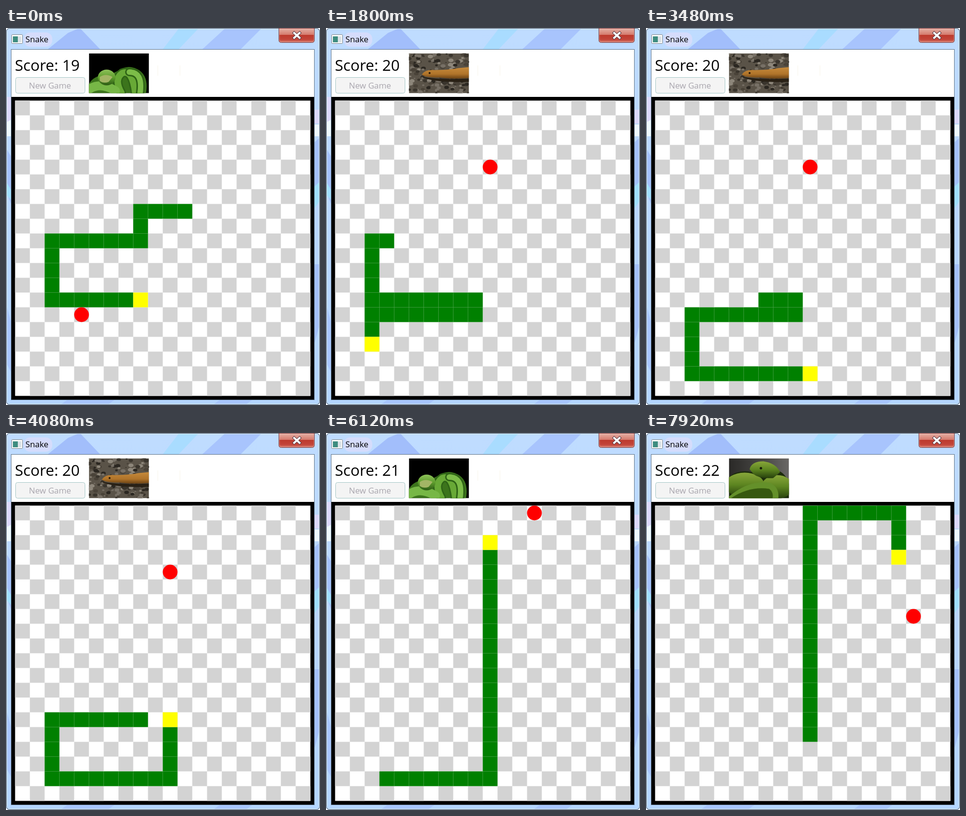
These frames come from a looping animation (638x766 px, 8000 ms). An HTML page with a canvas:

```html
<!DOCTYPE html>
<html lang="en">
<head>
<meta charset="utf-8">
<title>Snake</title>
<style>
html, body { margin: 0; width: 100%; height: 100%; overflow: hidden; background: #fff; }
#stage { position: relative; width: 638px; height: 766px; overflow: hidden; }
svg, canvas { position: absolute; display: block; }
svg { left: 0; top: 0; }
canvas { left: 11px; top: 140px; }
text { font-family: "Open Sans", "Noto Sans", sans-serif; }
</style>
</head>
<body>
<div id="stage">
<svg width="638" height="766" viewBox="0 0 638 766">
  <defs>
    <clipPath id="win"><path d="M0 766V8Q0 0 8 0H630Q638 0 638 8V758Q638 766 630 766H8Q0 766 0 758Z"/></clipPath>
    <clipPath id="pic"><rect x="0" y="0" width="122" height="81"/></clipPath>
    <linearGradient id="glass" x1="0" y1="0" x2="0" y2="1">
      <stop offset="0" stop-color="#bfdcff"/><stop offset=".5" stop-color="#b9d7ff"/><stop offset="1" stop-color="#b4d6ff"/>
    </linearGradient>
    <linearGradient id="red" x1="0" y1="0" x2="0" y2="1">
      <stop offset="0" stop-color="#e6b3a8"/><stop offset=".46" stop-color="#d4796c"/>
      <stop offset=".48" stop-color="#bd3a2e"/><stop offset=".8" stop-color="#c2453a"/><stop offset="1" stop-color="#dc8678"/>
    </linearGradient>
    <linearGradient id="skin" x1="0" y1="0" x2="0" y2="1">
      <stop offset="0" stop-color="#8fc25a"/><stop offset=".5" stop-color="#5f9e2e"/><stop offset="1" stop-color="#2c5a14"/>
    </linearGradient>
    <linearGradient id="moss" x1="0" y1="0" x2="0" y2="1">
      <stop offset="0" stop-color="#88a63a"/><stop offset=".5" stop-color="#5c8420"/><stop offset="1" stop-color="#263f0c"/>
    </linearGradient>
    <linearGradient id="tan" x1="0" y1="0" x2="0" y2="1">
      <stop offset="0" stop-color="#c58a3c"/><stop offset=".6" stop-color="#b0742a"/><stop offset="1" stop-color="#6b4214"/>
    </linearGradient>
    <linearGradient id="dusk" x1="0" y1="0" x2="1" y2="0">
      <stop offset="0" stop-color="#2a2927"/><stop offset=".6" stop-color="#4a4947"/><stop offset="1" stop-color="#6a6866"/>
    </linearGradient>
  </defs>

  <!-- window frame -->
  <g clip-path="url(#win)">
    <rect width="638" height="766" fill="url(#glass)"/>
    <path d="M84 44L126 10L150 0L192 44Z" fill="#a2befb"/>
    <path d="M318 44L352 0H392L350 44Z" fill="#a9dcff"/>
    <path d="M398 44L446 0H520L476 44Z" fill="#a8c4fd"/>
    <path d="M0 140H11V192H0ZM627 166H638V194H627Z" fill="#dcd8fb"/>
    <path d="M0 192L11 186V220H0ZM627 196H638V220H627Z" fill="#eefaff"/>
    <path d="M0 244L11 262V360L0 330ZM627 232L638 222V312L627 322ZM627 480H638V600L627 640Z" fill="#a4c1fc"/>
    <path d="M0 312L11 330V350L0 338ZM627 322L638 312V350L627 366Z" fill="#a0dffe"/>
    <path d="M0 560L11 600V700L0 680ZM110 766L124 756H220L206 766ZM420 766L434 756H500L486 766Z" fill="#a8c6fd"/>
    <rect x="36" y="9" width="58" height="29" rx="13" fill="#dcdcfb" opacity=".75"/>
    <path d="M1.5 760V8Q1.5 1.5 8 1.5H630Q636.5 1.5 636.5 8V758Q636.5 764.5 630 764.5H8Q1.5 764.5 1.5 758" fill="none" stroke="#e4f2ff"/>
    <rect x=".5" y=".5" width="637" height="765" rx="7.5" fill="none" stroke="#2c3a4a"/>
  </g>

  <!-- title bar -->
  <g>
    <rect x="11.5" y="13.5" width="22" height="18" rx="1" fill="#fbfbfb" stroke="#80868c"/>
    <rect x="14" y="17" width="17" height="12" fill="#d9e2e6"/>
    <rect x="14" y="17" width="10" height="12" fill="#3d8c80"/>
    <text x="39.5" y="29" font-size="16.8">Snake</text>
    <path d="M554.5 .5H626.500V24.500Q626.500 29.500 621.500 29.500H559.500Q554.500 29.500 554.500 24.500Z" fill="url(#red)" stroke="#6a2a30"/>
    <path d="M555.5 1.500H625.500V24Q625.500 28.500 621 28.500H560Q555.500 28.500 555.500 24Z" fill="none" stroke="#f2c5bc" stroke-opacity=".55"/>
    <path d="M585.5 10L596.500 20M596.500 10L585.500 20" stroke="#5b3a44" stroke-width="6" stroke-linecap="square"/>
    <path d="M585.5 10L596.500 20M596.500 10L585.500 20" stroke="#fff" stroke-width="3.800" stroke-linecap="square"/>
  </g>

  <!-- client area -->
  <rect x="10.5" y="43.5" width="616" height="712" fill="#fff" stroke="#5f7488"/>
  <text id="score" x="18" y="87" font-size="31">Score: 19</text>
  <rect x="19.5" y="100.500" width="141" height="32" rx="4" fill="#f4f4f4" stroke="#a3c6c6"/>
  <text x="46.500" y="123" font-size="16.800" fill="#a9a6ae">New Game</text>
  <path id="marks" d="M308.500 76V97M353.500 76V97" stroke="#f8f4ea"/>

  <g transform="translate(168.500 51.500)" clip-path="url(#pic)">
    <g class="photo">
      <rect width="122" height="81" fill="#000"/>
      <path d="M0 62Q12 42 38 46L62 34Q80 22 100 33Q122 46 116 81H0Z" fill="#3c741c"/>
      <g fill="none" stroke-linecap="round">
        <path d="M66 80Q50 52 68 40Q88 32 94 80" stroke="#2f6416" stroke-width="19"/>
        <path d="M66 80Q50 52 68 40Q88 32 94 80" stroke="#68a936" stroke-width="13"/>
        <path d="M82 38Q110 38 104 80" stroke="#2f6416" stroke-width="17"/>
        <path d="M82 38Q110 38 104 80" stroke="#7cbc48" stroke-width="11"/>
        <path d="M2 72Q24 58 54 76" stroke="#77b746" stroke-width="18"/>
      </g>
      <ellipse cx="36" cy="49" rx="18" ry="16" fill="url(#skin)"/>
      <path d="M22 48Q34 40 48 48L40 58Q30 62 22 56Z" fill="#a3b565"/>
    </g>
    <g class="photo" visibility="hidden">
      <rect width="122" height="81" fill="#5a5348"/>
      <g id="gravel"></g>
      <path d="M26 47Q60 54 122 51V58Q60 60 30 50Z" fill="#292116"/>
      <path d="M27 42Q34 32 52 34Q82 34 100 30L122 28V50Q92 53 62 49Q38 50 27 44Z" fill="url(#tan)"/>
      <circle cx="42" cy="40" r="2" fill="#2a1a08"/>
    </g>
    <g class="photo" visibility="hidden">
      <rect width="122" height="81" fill="url(#dusk)"/>
      <path d="M0 38Q18 22 48 28L92 22Q116 28 122 52V81H0Z" fill="#1c2c0c"/>
      <ellipse cx="32" cy="54" rx="40" ry="25" fill="url(#moss)"/>
      <ellipse cx="98" cy="58" rx="32" ry="24" fill="url(#moss)"/>
      <path d="M-4 81Q40 42 84 50Q104 60 100 84H-4Z" fill="#64902a"/>
      <path d="M4 81Q42 56 82 62Q92 70 88 84Z" fill="#36580f"/>
      <path d="M42 22Q46 6 70 6Q96 10 104 28L90 40Q62 42 50 32Z" fill="url(#moss)"/>
      <circle cx="65" cy="20" r="2.500" fill="#161d08"/>
    </g>
  </g>
</svg>
<canvas id="board" width="615" height="615"></canvas>
</div>

<script>
const LOOP = 8000, TICK = 120, CELL = 30, SIDE = 20, EDGE = 7.5, LENGTH = 22;
const idle = [2, 6, 10, 14, 17, 21, 24, 28, 31, 35, 39, 42, 45, 49, 52, 57, 61, 64];
const eats = [7, 35, 42];
const apples = [[4, 14], [10, 4], [13, 0], [17, 7]];
const photoOf = [0, 1, 0, 2];

const dirs = { L: [-1, 0], R: [1, 0], U: [0, -1], D: [0, 1] };
const trail = [[11, 7]];
for (const leg of 'L3 D2 L6 D4 R6 R1 D1 L7 D4 R8 U18 R6 D3'.split(' ')) {
  const [dx, dy] = dirs[leg[0]];
  for (let i = +leg.slice(1); i--;) {
    const [x, y] = trail[trail.length - 1];
    trail.push([x + dx, y + dy]);
  }
}

const ctx = document.getElementById('board').getContext('2d');
const score = document.getElementById('score');
const marks = document.getElementById('marks');
const photos = document.querySelectorAll('.photo');

function cell([x, y], color) {
  ctx.fillStyle = color;
  ctx.fillRect(EDGE + x * CELL, EDGE + y * CELL, CELL, CELL);
}

function drawBoard(step, eaten) {
  ctx.fillStyle = '#000';
  ctx.fillRect(0, 0, 615, 615);
  ctx.fillStyle = '#fff';
  ctx.fillRect(EDGE, EDGE, SIDE * CELL, SIDE * CELL);
  for (let y = 0; y < SIDE; y++)
    for (let x = y % 2; x < SIDE; x += 2) cell([x, y], '#d3d3d3');

  // the tail waits one step after each meal
  const tail = step - eats.filter(e => step > e).length;
  const head = step + LENGTH - 1;
  for (let i = tail; i < head; i++) cell(trail[i], '#008000');
  cell(trail[head], '#ffff00');

  const [ax, ay] = apples[eaten];
  ctx.fillStyle = '#f00';
  ctx.beginPath();
  ctx.arc(EDGE + (ax + .5) * CELL, EDGE + (ay + .5) * CELL, CELL / 2, 0, Math.PI * 2);
  ctx.fill();
}

function scatterGravel() {
  let seed = 7, out = '';
  const rnd = () => (seed = seed * 16807 % 2147483647) / 2147483647;
  const tones = ['#3a352d', '#777066', '#4a4339', '#8d867a', '#2b2721'];
  for (let i = 0; i < 170; i++) {
    const r = 1.5 + rnd() * 4;
    out += `<ellipse cx="${rnd() * 122}" cy="${rnd() * 81}" rx="${r}" ry="${r * .7}" fill="${tones[i % 5]}"/>`;
  }
  document.getElementById('gravel').innerHTML = out;
}

let shown = -1;
function frame() {
  const tick = Math.floor(performance.now() % LOOP / TICK);
  if (tick !== shown) {
    shown = tick;
    const step = tick - idle.filter(i => i <= tick).length;
    const eaten = eats.filter(e => step >= e).length;
    drawBoard(step, eaten);
    score.textContent = 'Score: ' + (19 + eaten);
    photos.forEach((p, i) => p.setAttribute('visibility', i === photoOf[eaten] ? 'visible' : 'hidden'));
    marks.setAttribute('visibility', step < 38 ? 'visible' : 'hidden');
  }
  requestAnimationFrame(frame);
}

scatterGravel();
frame();
</script>
</body>
</html>
```
